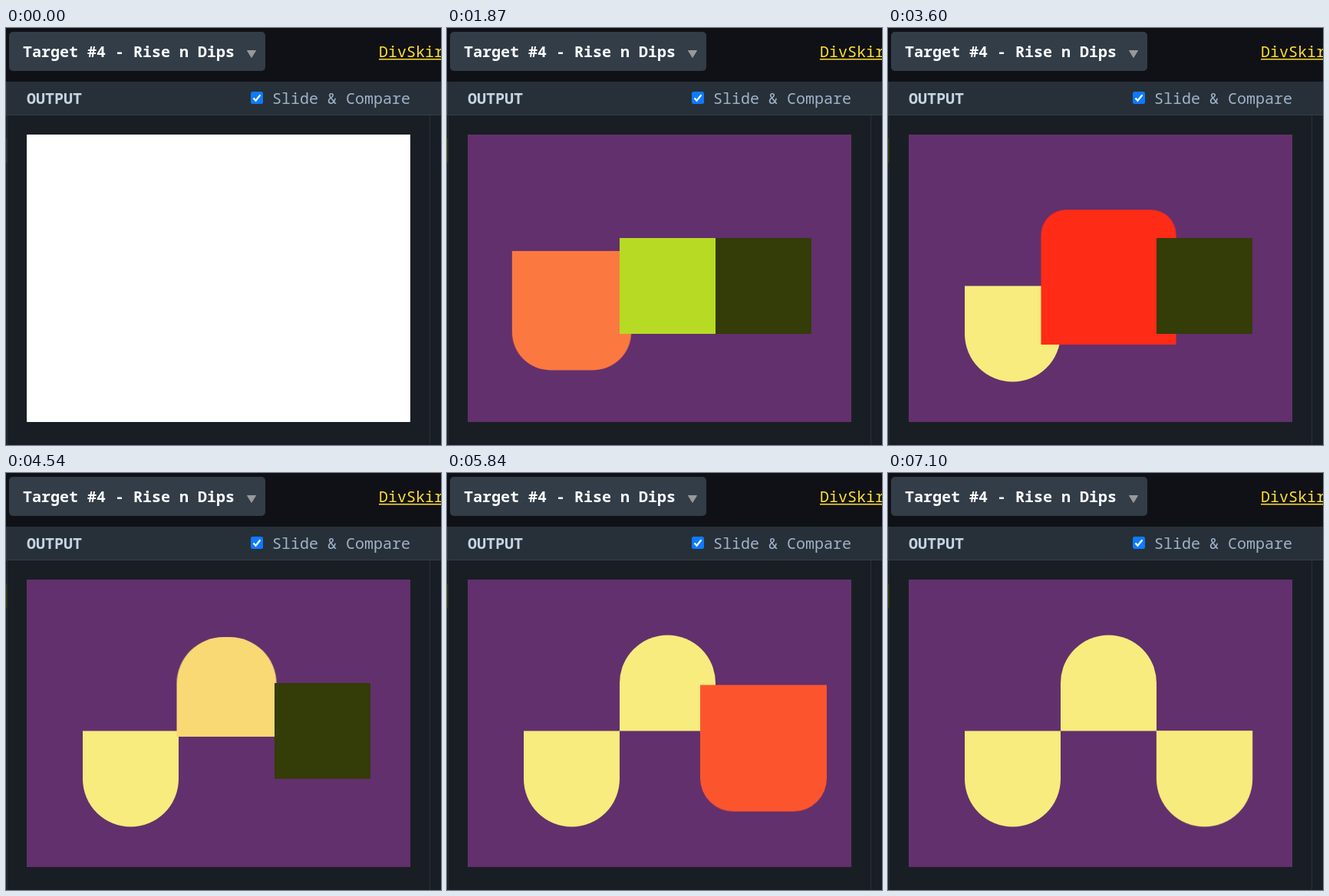
These frames come from a looping animation (567 by 544 pixels, 7160 ms). An HTML page:

```html
<!DOCTYPE html>
<html lang="en">
<head>
<meta charset="utf-8">
<title>Target #4</title>
<style>
  html, body { margin: 0; width: 100%; height: 100%; overflow: hidden; background: #191e24; }
  #chrome { position: absolute; left: 0; top: 0; }
  text { font: 500 20px "Noto Sans Mono", "Liberation Mono", monospace; white-space: pre; }
  .bold { font-weight: 700; }

  #output {
    position: absolute; left: 27px; top: 139px; width: 500px; height: 375px;
    background: #62306d; overflow: hidden;
  }
  .square {
    position: absolute; left: var(--x); top: 135px; width: 125px; height: 125px;
    background: var(--color);
    animation: morph 2040ms ease paused both;
    animation-delay: calc(var(--start) - var(--t, 0ms));
  }
  .one   { --x: 73px;  --color: #f7ec7d; --start: 1109ms; }
  .two   { --x: 198px; --color: #b7da25; --start: 3128ms; }
  .three { --x: 323px; --color: #343c07; --start: 5205ms; }
  .down  { --dy: 62.5px;  --round: 0 0 62.5px 62.5px; }
  .up    { --dy: -62.5px; --round: 62.5px 62.5px 0 0; }

  @keyframes morph {
    0%   { border-radius: 0; transform: translateY(0) scale(1); }
    10%  { background: #f00; transform: translateY(0) scale(1.5); }
    100% { background: #f7ec7d; border-radius: var(--round); transform: translateY(var(--dy)) scale(1); }
  }

  #output.blank { background: #fff; }
  .blank .square { visibility: hidden; }
</style>
</head>
<body>
<svg id="chrome" width="567" height="544" viewBox="0 0 567 544">
  <rect width="567" height="70" fill="#101116"/>
  <rect x="4" y="5" width="334" height="51" rx="5" fill="#323d48"/>
  <text class="bold" x="22" y="38" fill="#fff">Target #4 - Rise n Dips</text>
  <path d="M314.5 29.5h11l-5.5 9z" fill="#999" stroke="#999" stroke-linejoin="round"/>
  <text x="486" y="38" fill="#ffdf2d">DivSkirmish</text>
  <rect x="486" y="40" width="81" height="1.5" fill="#ffdf2d"/>

  <rect y="70" width="567" height="44" fill="#333d47"/>
  <rect x="1" y="70" width="566" height="43" fill="#273038"/>
  <text class="bold" x="27" y="99" fill="#c5d5e4">OUTPUT</text>
  <rect x="319" y="83" width="16" height="16" rx="2.5" fill="#0d7aff"/>
  <path d="M322.5 91.5l3 3.2 6-7.4" fill="none" stroke="#fff" stroke-width="2.3"/>
  <text x="347" y="99" fill="#a0b3ca">Slide &amp; Compare</text>

  <rect y="114" width="567" height="430" fill="#191e24"/>
  <rect x="553" y="114" width="14" height="430" fill="#191d26"/>
  <rect x="1" y="114" width="1" height="430" fill="#262d34"/>
  <rect x="552" y="114" width="1" height="430" fill="#2a3138"/>
  <rect id="edge" y="144" width="1.5" height="32" fill="#2c343c"/>
</svg>
<div id="output" class="blank">
  <div class="square one down"></div>
  <div class="square two up"></div>
  <div class="square three down"></div>
</div>
<script>
  const LOOP = 7160;
  const BLANK = 150;
  const STEPS = 7;
  const groups = [1230, 2340, 3450, 4540, 5670, 6780, 7890];
  const output = document.getElementById('output');
  const edge = document.getElementById('edge');

  function stepTime(t) {
    const early = t + 12;
    if (early < groups[0]) return 0;
    const i = groups.findLastIndex(start => early >= start);
    const step = (groups[i + 1] - groups[i]) / STEPS;
    return groups[i] + Math.floor((early - groups[i]) / step) * step;
  }

  function draw(now) {
    const t = now % LOOP;
    const blank = t < BLANK;
    output.classList.toggle('blank', blank);
    edge.setAttribute('fill', blank ? '#2c343c' : '#343c07');
    output.style.setProperty('--t', stepTime(t) + 'ms');
    requestAnimationFrame(draw);
  }
  draw(performance.now());
</script>
</body>
</html>
```
